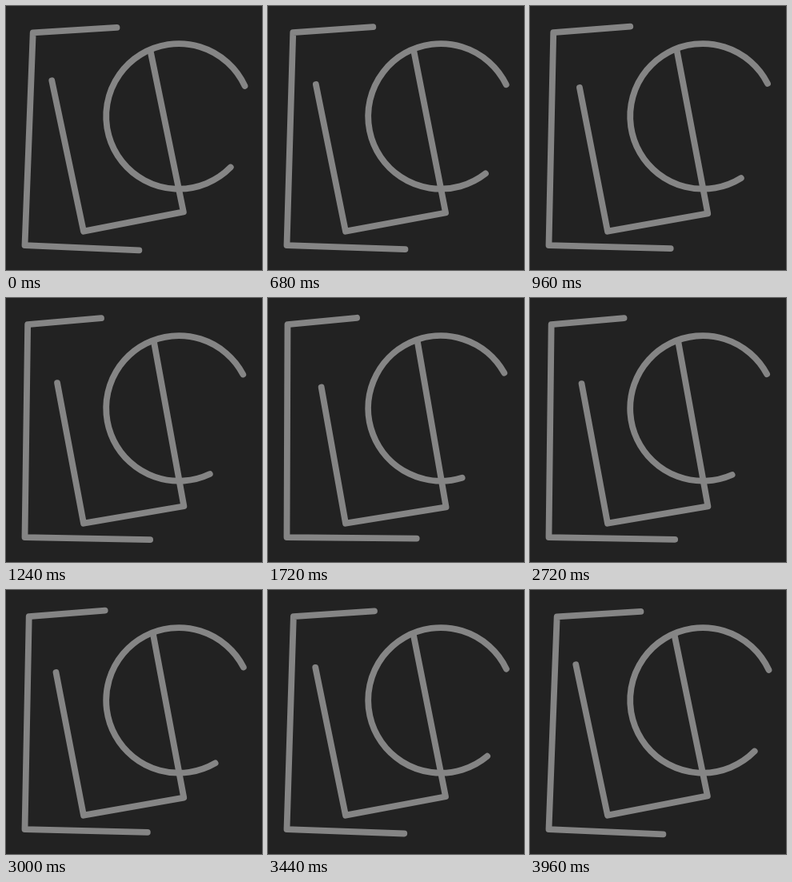
An HTML page that plays this animation: 320x330 px, repeating every 4 s.

```html
<!DOCTYPE html>
<html lang="en">
<head>
<meta charset="utf-8">
<title>Swaying line letters</title>
<style>
  html, body { margin: 0; width: 100%; height: 100%; overflow: hidden; background: #222; }
  svg { display: block; width: 320px; height: 330px; }
  path { fill: none; stroke: #858585; stroke-width: 7.8; stroke-linecap: round; stroke-linejoin: round; }
</style>
</head>
<body>
<svg viewBox="0 0 320 330">
  <path id="bracket"/>
  <path id="ell"/>
  <path id="arc"/>
</svg>
<script>
const LOOP = 4000, STEP = 40, LAG = 15;

const byId = id => document.getElementById(id);

// Point at a distance from another, heading in degrees clockwise from east.
function reach([x, y], heading, length) {
  const a = heading * Math.PI / 180;
  return [x + length * Math.cos(a), y + length * Math.sin(a)];
}

const polyline = points => "M" + points.map(pt => pt.join(" ")).join("L");

// Both frames turn about a fixed corner while their free arms grow or shrink.
function bracket(p) {
  const tilt = 2.2 - 2.1 * p;
  const foot = [23.5, 299.1];
  const head = reach(foot, tilt - 90, 266);
  return polyline([
    reach(head, tilt - 5.7, 105 - 19 * p), head,
    foot, reach(foot, tilt + 0.3, 143 + 20.3 * p)
  ]);
}

function ell(p) {
  const tilt = -11.9 + 1.9 * p;
  const foot = [97, 281.7];
  const side = reach(foot, tilt + 0.9, 127.2);
  return polyline([
    reach(foot, tilt - 90, 192.6 - 20.8 * p), foot,
    side, reach(side, tilt - 89.7, 206 + 6 * p)
  ]);
}

function arc(p) {
  const center = [216, 137.9], r = 90.8;
  const from = reach(center, -24.7 - 4.7 * p, r);
  const to = reach(center, 44.5 + 30 * p, r);
  return `M${from}A${r} ${r} 0 1 0 ${to}`;
}

const shapes = { bracket, ell, arc };

function draw(ms) {
  const t = Math.floor((ms % LOOP) / STEP) * STEP;
  const p = (1 - Math.cos(2 * Math.PI * (t - LAG) / LOOP)) / 2;
  for (const id in shapes) byId(id).setAttribute("d", shapes[id](p));
}

let start;
function tick(now) {
  start ??= now;
  draw(now - start);
  requestAnimationFrame(tick);
}
draw(0);
requestAnimationFrame(tick);
</script>
</body>
</html>
```
